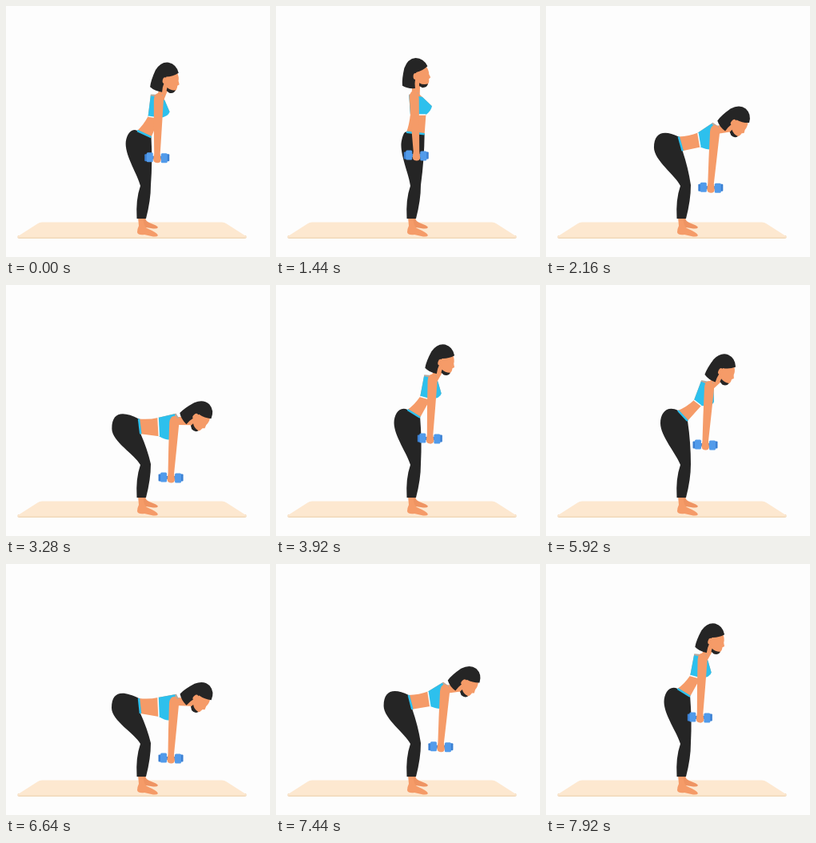
Recreate the animation shown at these times as an HTML page with a canvas. Size 330 px wide and 314 px high, loop 8000 ms.

```html
<!DOCTYPE html>
<html lang="en">
<head>
<meta charset="utf-8">
<title>Dumbbell deadlift</title>
<style>
  html, body { margin: 0; width: 100%; height: 100%; overflow: hidden; background: #fdfdfd; }
  canvas { display: block; width: 330px; height: 314px; }
</style>
</head>
<body>
<canvas></canvas>
<script>
const WIDTH = 330, HEIGHT = 314, STEP = 80;
const CYCLE = 4000, LOOP_OFFSET = 3200;
const LOWER = { start: 400, length: 1440 }, RISE = { start: 2400, length: 1520 };
const SKIN = '#f59b68', DARK = '#252525', CYAN = '#2dc0ed', BLUE = '#529bea', DEEP_BLUE = '#3b80d3';

const canvas = document.querySelector('canvas');
const ctx = canvas.getContext('2d');
const ratio = window.devicePixelRatio || 1;
canvas.width = WIDTH * ratio;
canvas.height = HEIGHT * ratio;

// Each joint follows a parabola through its upright, halfway and bent positions.
const joints = {
  ear:        [[172, 88], [218, 108], [237, 167]],
  shoulder:   [[171, 112], [204, 126], [210, 172]],
  upperBack:  [[165, 112], [194, 120], [212, 163]],
  braBack:    [[167, 136], [185, 144], [190, 167]],
  braFront:   [[187, 136], [194, 151], [191, 191]],
  bust:       [[194, 125], [210, 146], [206, 193]],
  hand:       [[174, 187], [199, 200], [206, 243]],
  waistBack:  [[163, 158], [165, 157], [166, 168]],
  waistFront: [[186, 160], [177, 170], [168, 187]],
  butt:       [[157, 174], [143, 173], [132, 180]]
};
const HEAD_TURN = 50 * Math.PI / 180;

const progress = (time, { start, length }) => Math.min(1, Math.max(0, (time - start) / length));
const easeInOut = p => p < .5 ? 4 * p ** 3 : 1 - 4 * (1 - p) ** 3;
const smooth = p => p * p * (3 - 2 * p);

// 0 is upright, 1 fully bent; rising starts quickly and settles slowly.
function bendAt(time) {
  const rise = 1 - (1 - progress(time, RISE)) ** 1.5;
  return easeInOut(progress(time, LOWER)) - smooth(rise);
}

function poseAt(bend) {
  const along = ([a, b, c]) => a * (1 - bend) * (1 - 2 * bend) + 4 * b * bend * (1 - bend) + c * bend * (2 * bend - 1);
  const pose = { turn: HEAD_TURN * bend };
  for (const name in joints) {
    pose[name] = [0, 1].map(axis => along(joints[name].map(point => point[axis])));
  }
  return pose;
}

function fill(color, path) {
  ctx.fillStyle = color;
  ctx.fill(new Path2D(path));
}

function line(color, width, from, to, cap = 'butt') {
  ctx.strokeStyle = color;
  ctx.lineWidth = width;
  ctx.lineCap = cap;
  ctx.stroke(new Path2D(`M${from} L${to}`));
}

function box(color, x, y, w, h, r) {
  ctx.fillStyle = color;
  ctx.beginPath();
  ctx.roundRect(x, y, w, h, r);
  ctx.fill();
}

const shift = ([x, y], dx, dy) => [x + dx, y + dy];
const mix = (a, b, p) => [a[0] + (b[0] - a[0]) * p, a[1] + (b[1] - a[1]) * p];

function drawMat() {
  fill('#f1d9ba', 'M15 287 H300 Q302 291 298 291 H17 Q13 291 15 287Z');
  fill('#fde8d0', 'M45 270.5 H270 Q273 270.5 275 272 L300 288 Q301 289.5 298 289.5 H17 Q14 289.5 15 288 L40 272 Q42 270.5 45 270.5Z');
}

function drawFeet() {
  fill('#ef9462', 'M167 264 H174 Q174 269 179 271 Q190 275 190 277 Q189 279 184 278.5 L169 276Z');
  fill(SKIN, 'M165 264 H172 Q171 274 176 278 Q190 284 190 287 Q189 289 184 288.5 L173 286 Q165 287 164 283 Q164 279 166 275Z');
}

function drawTorso({ waistBack, waistFront, braBack, braFront, bust, upperBack, shoulder, ear }) {
  const collar = shift(shoulder, 5, -3);
  const chest = mix(collar, bust, .3);
  line(SKIN, 10, shift(ear, 1, 6), shift(shoulder, 2, 0), 'round');
  fill(SKIN, `M${waistBack} Q${shift(mix(waistBack, braBack, .5), 1, 2)} ${braBack} L${upperBack} L${collar} L${bust} L${braFront} L${waistFront}Z`);
  fill(CYAN, `M${braBack} L${upperBack} L${shoulder} L${chest} Q${mix(chest, bust, .5)} ${bust} Q${shift(bust, -1, 6)} ${braFront}Z`);
  line('#fff', 1.5, braBack, braFront);
  line('#b5aaa0', 2, upperBack, collar);
}

function drawLegs({ waistBack, waistFront, butt }) {
  const depth = waistBack[0] - butt[0];
  const thigh = shift(mix(waistFront, [181, 224], .5), 2, 0);
  fill(DARK, `M${waistBack}
    C${shift(waistBack, -.6 * depth, -.3 * depth)} ${shift(butt, 0, -.62 * depth)} ${butt}
    C${shift(butt, 0, 16)} ${168 - depth * .2} 212 168 225
    Q162 242 163.5 266 H175 Q181 243 181 224 Q${thigh} ${waistFront}Z`);
  line(CYAN, 2.5, waistBack, waistFront);
}

function drawDumbbell([x, y]) {
  box(DEEP_BLUE, x - 12, y - 2, 24, 4, 1);
  for (const side of [-1, 1]) {
    box(DEEP_BLUE, x + side * 13 - 2.5, y - 4.5, 5, 9, 1);
    box(BLUE, x + side * 9 - 4, y - 6 + side * .5, 8, 12, 1.5);
  }
}

function drawArm({ shoulder, hand }) {
  const elbow = mix(shoulder, hand, .5);
  const wrist = shift(hand, 0, -5);
  fill(SKIN, `M${shift(shoulder, -6, 2)} Q${shift(shoulder, -5, -6)} ${shift(shoulder, 0, -6)}
    Q${shift(shoulder, 6, -5)} ${shift(shoulder, 6, 4)}
    L${shift(elbow, 5, 0)} L${shift(wrist, 4, 0)} L${shift(hand, 5, 3)} Q${shift(hand, 4, 7)} ${shift(hand, 0, 6.5)}
    Q${shift(hand, -5, 6)} ${shift(hand, -4.5, 1)} L${shift(wrist, -3.5, 0)} L${shift(elbow, -5, 0)}Z`);
}

function drawHead({ ear, turn }) {
  ctx.save();
  ctx.translate(...ear);
  ctx.rotate(turn);
  fill(SKIN, 'M-3 -8 L13 -13 Q17 -8 17 -3 L19 1 L17 3 Q18 9 14 11 Q9 12 4 12 L-3 8Z');
  fill(DARK, 'M5 8 Q10 11 16 9 Q15 14 9 14 L5 12Z');
  fill(DARK, 'M15 -13 Q10 -23 0 -23 Q-10 -22 -14 -10 Q-17 4 -16 12 Q-9 16 0 15 Q-1 9 0 3 L1 -5 Q9 -7 15 -13Z');
  ctx.fillStyle = SKIN;
  ctx.beginPath();
  ctx.ellipse(0, 0, 2.6, 4, 0, 0, 2 * Math.PI);
  ctx.fill();
  ctx.restore();
}

function draw(time) {
  const phase = (Math.floor(time / STEP) * STEP + LOOP_OFFSET) % CYCLE;
  const pose = poseAt(bendAt(phase));
  ctx.setTransform(ratio, 0, 0, ratio, 0, 0);
  ctx.fillStyle = '#fdfdfd';
  ctx.fillRect(0, 0, WIDTH, HEIGHT);
  drawMat();
  drawFeet();
  drawTorso(pose);
  drawLegs(pose);
  drawDumbbell(pose.hand);
  drawArm(pose);
  drawHead(pose);
}

let began;
function tick(now) {
  began ??= now;
  draw(now - began);
  requestAnimationFrame(tick);
}
draw(0);
requestAnimationFrame(tick);
</script>
</body>
</html>
```
